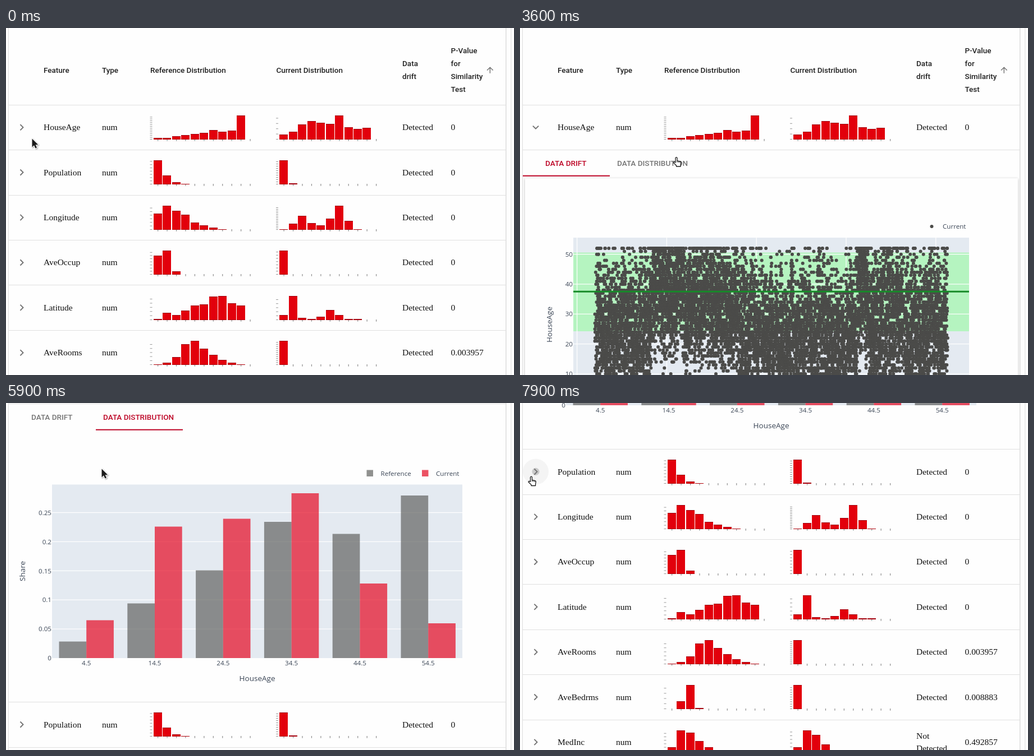
Animation, 905 px wide and 619 px high, one loop 8000 ms. Source, as an HTML page with a canvas:

```html
<!DOCTYPE html>
<html lang="en">
<head>
<meta charset="utf-8">
<title>Data drift table</title>
<style>
html, body { margin: 0; width: 100%; height: 100%; overflow: hidden; background: #fefefe; }
canvas { display: block; }
</style>
</head>
<body>
<canvas id="stage" width="905" height="619"></canvas>
<script>
const LOOP = 8000, STEP = 100, ROW = 80.4, PANEL = 532;
const HEAD = '500 13.5px Roboto, sans-serif';
const CELL = '15.5px "Liberation Serif", serif';
const AXIS = '11.6px "Open Sans", sans-serif';
const TITLE = '13.5px "Open Sans", sans-serif';
const INK = '#3b4656', GREY = '#757575', ACCENT = '#bd0526', PLOT = '#e4eaf1';

// Bar heights of the left and right histograms, and their y-axis tick spacing
const rows = [
  { name: 'HouseAge', p: '0', left: [3, 3, 6, 8, 10, 12, 17, 14, 16, 43], right: [9, 14, 27, 33, 30, 28, 43, 22, 19, 21], ticks: [3.3, 9.4] },
  { name: 'Population', p: '0', left: [43, 16, 4, 1], right: [43, 2], ticks: [5.8, 4] },
  { name: 'Longitude', p: '0', left: [29, 43, 34, 27, 13, 8, 4, 1], right: [1, 11, 25, 12, 8, 20, 43, 16, 1], ticks: [6.4, 3] },
  { name: 'AveOccup', p: '0', left: [34, 43, 6], right: [43], ticks: [5.6, 5.7] },
  { name: 'Latitude', p: '0', left: [2, 13, 9, 17, 26, 28, 42, 43, 30, 26], right: [9, 43, 4, 2, 6, 18, 9, 2, 2], ticks: [7.4, 7.2] },
  { name: 'AveRooms', p: '0.003957', left: [1, 4, 14, 37, 43, 29, 18, 9, 4, 1], right: [43], ticks: [7.2, 3.6] },
  { name: 'AveBedrms', p: '0.008883', left: [0, 14, 43, 2], right: [43], ticks: [9.2, 4.2] },
  { name: 'MedInc', p: '0.492857', left: [13, 43, 39, 24, 13, 6, 3, 1], right: [13, 43, 35, 18, 7, 3, 1], ticks: [6.2, 6.6] }
];

// Time, cursor shape, position
const cursorKeys = [
  [0, 'arrow', 46, 197], [300, 'arrow', 40, 191], [400, 'hand', 30, 184.5], [2200, 'hand', 32, 186.5],
  [2500, 'hand', 28.5, 180.5], [2700, 'hand', 34, 182], [2800, 'arrow', 43, 186], [2900, 'arrow', 49, 188],
  [3100, 'arrow', 118, 206], [3200, 'hand', 240, 246], [3300, 'hand', 312, 261], [3400, 'hand', 272.5, 230],
  [4200, 'arrow', 275, 231], [4700, 'cross', 274.5, 232.5], [5200, 'cross', 268, 222], [5300, 'arrow', 235, 180],
  [5400, 'arrow', 195, 140], [5500, 'arrow', 165, 104], [5600, 'arrow', 170, 117], [6500, 'arrow', 171, 124],
  [6900, 'arrow', 120, 127], [7000, 'arrow', 70, 126], [7100, 'hand', 24, 126], [7200, 'hand', 20, 129],
  [7600, 'hand', 12, 129], [7700, 'hand', 14, 130.5]
];
const scrollKeys = [[4000, 0], [4300, 51], [4600, 51], [4700, 154], [5800, 154], [6200, 402],
  [6500, 605], [6700, 666], [6800, 666], [6900, 667]];

const chevron = new Path2D('M-2-6L-3.4-4.6 1.2 0-3.4 4.6-2 6l6-6z');
const upArrow = new Path2D('M4 12l1.4 1.4L11 7.8V20h2V7.8l5.6 5.6L20 12l-8-8z');
const arrowShape = new Path2D('M.5.5V15.5L4 12.3 6.4 17.6 9 16.5 6.6 11.3H11.3z');
const handShape = new Path2D('M4.5 10V2.2a1.5 1.5 0 0 1 3 0V7l5.5 1.2q1.5.5 1.3 2l-.7 3.8V17H6v-1.8L1 10.5q0-2 1.8-1.3z');
const fingers = new Path2D('M7.5 7v3M10 7.6v2.6M12.3 8.1v2.4');
const crossShape = new Path2D('M-8.5 0H8.5M0-8.5V8.5');

const g = document.getElementById('stage').getContext('2d');

const clamp = v => Math.max(0, Math.min(1, v));

function sample(keys, t) {
  const i = keys.findIndex(k => k[0] > t);
  if (i === 0) return keys[0][1];
  if (i < 0) return keys[keys.length - 1][1];
  const [t0, a] = keys[i - 1], [t1, b] = keys[i];
  return a + (b - a) * (t - t0) / (t1 - t0);
}

function rect(x, y, w, h, color) {
  g.fillStyle = color;
  g.fillRect(x, y, w, h);
}

function disc(x, y, r, color) {
  g.fillStyle = color;
  g.beginPath();
  g.arc(x, y, r, 0, 7);
  g.fill();
}

function text(str, x, y, font, color, align = 'left') {
  g.font = font;
  g.fillStyle = color;
  g.textAlign = align;
  g.fillText(str, x, y);
}

function sideText(str, x, y) {
  g.save();
  g.translate(x, y);
  g.rotate(-Math.PI / 2);
  text(str, 0, 4.8, TITLE, INK, 'center');
  g.restore();
}

function shape(path, x, y, color, scale = 1, angle = 0) {
  g.save();
  g.translate(x, y);
  g.rotate(angle);
  g.scale(scale, scale);
  g.fillStyle = color;
  g.fill(path);
  g.restore();
}

function histogram(x, base, bars, gap) {
  for (let y = base - 1; y > base - 43; y -= gap) rect(x, y, 4, 1, '#999');
  for (let i = 0; i < 11; i++) rect(x + 13.5 + i * 16.45, base - 1, 1.2, 3.7, '#8c8c8c');
  bars.forEach((h, i) => {
    if (!h) return;
    const left = Math.round(x + 6.4 + i * 16.45);
    rect(left, base - h, 15, h, '#e2000c');
    rect(left, base - h, 15, 1, '#9c0010');
    rect(left, base - 1, 15, 1, '#b0000c');
  });
}

function header() {
  const label = (str, x, y) => text(str, x, y + 4.8, HEAD, '#212121');
  label('Feature', 67, 75);
  label('Type', 171, 75);
  label('Reference Distribution', 257, 75);
  label('Current Distribution', 481.5, 75);
  ['Data', 'drift'].forEach((s, i) => label(s, 706, 63.2 + i * 23.2));
  ['P-Value', 'for', 'Similarity', 'Test'].forEach((s, i) => label(s, 792.5, 40 + i * 23.2));
  shape(upArrow, 853.6, 66.3, GREY, 0.725);
  rect(5, 137, 885, 1, '#e0e0e0');
}

function row(r, cy, angle) {
  const cell = (str, x, dy = 0) => text(str, x, cy + 5 + dy, CELL, '#111');
  shape(chevron, 28, cy, GREY, 0.966, angle);
  cell(r.name, 67);
  cell('num', 171);
  const base = Math.round(cy + 21.7);
  histogram(256.5, base, r.left, r.ticks[0]);
  histogram(481, base, r.right, r.ticks[1]);
  if (r.name === 'MedInc') {
    cell('Not', 706, -10.7);
    cell('Detected', 706, 10.7);
  } else cell('Detected', 706);
  cell(r.p, 792.5);
  rect(5, Math.round(cy + 40), 885, 1, '#e0e0e0');
}

// Seeded scatter: each stretch of x has its own mean age and spread
const scatter = (() => {
  const layer = document.createElement('canvas');
  layer.width = 905;
  layer.height = 619;
  const c = layer.getContext('2d');
  let seed = 7;
  const rnd = () => (seed = seed * 16807 % 2147483647) / 2147483647;
  const bell = () => (rnd() + rnd() + rnd() + rnd() - 2) * 1.73;
  const zones = [[232, 24, 12], [296, 39, 10], [388, 33, 10], [432, 25, 12], [500, 21, 11],
    [560, 24, 12], [600, 21, 11], [622, 41, 11], [690, 27, 12], [763, 25, 12]];
  const total = 11500;
  let shift = 0;
  c.fillStyle = '#4b4b49';
  for (let i = 0; i < total; i++) {
    const x = 134 + 627 * i / total;
    if (i % 45 === 0) shift = bell() * 5;
    const [, mean, spread] = zones.find(z => x < z[0]);
    const age = Math.round(Math.max(2, Math.min(52, mean + shift + bell() * spread)));
    c.beginPath();
    c.arc(x + bell(), 670.4 - 5.333 * age, 3, 0, 7);
    c.fill();
  }
  return layer;
})();

function driftPlot() {
  g.save();
  g.shadowColor = 'rgba(0,0,0,.28)';
  g.shadowBlur = 4;
  g.shadowOffsetY = 1;
  rect(9, 268, 878, 470, '#fefefe');
  g.restore();
  disc(733.5, 354, 3, '#4b4b49');
  text('Current', 753, 358.2, AXIS, INK);
  rect(95, 374, 705, 300, PLOT);
  rect(95, 400.5, 705, 140.5, 'rgba(160,250,170,.68)');
  for (let i = 0; i < 5; i++) {
    rect(101 + i * 159.8, 374, 1.2, 300, '#fff');
    rect(95, 403 + i * 53.33, 705, 1.2, '#fff');
    text(String(50 - i * 10), 94, 407.8 + i * 53.33, AXIS, INK, 'right');
  }
  g.drawImage(scatter, 0, 0);
  rect(95, 468.7, 705, 3, '#168a28');
  sideText('HouseAge', 52, 529);
}

function sharePlot() {
  const greyBars = [29.5, 97.5, 156.5, 243, 221.5, 290], redBars = [67.5, 234.5, 248.5, 294, 133, 62];
  const grey = 'rgba(99,100,97,.7)', red = 'rgba(229,10,35,.7)';
  g.save();
  g.translate(0, 154);
  rect(642.5, 181.5, 11.5, 11.5, grey);
  text('Reference', 667.5, 191.5, AXIS, INK);
  rect(741, 181.5, 11.5, 11.5, red);
  text('Current', 766, 191.5, AXIS, INK);
  rect(82, 207.5, 731, 309.5, PLOT);
  for (let i = 0; i < 6; i++) {
    const y = 517 - i * 51.9, x = 143.2 + i * 121.8;
    if (i) rect(82, y - 0.6, 731, 1.2, '#fff');
    text(String(i * 5 / 100), 81, y + 4.2, AXIS, INK, 'right');
    text((i * 10 + 4.5).toFixed(1), x, 529.7, AXIS, INK, 'center');
  }
  for (let i = 0; i < 6; i++) {
    const x = 143.2 + i * 121.8;
    rect(x - 48.7, 517 - greyBars[i], 48.7, greyBars[i], grey);
    rect(x, 517 - redBars[i], 48.7, redBars[i], red);
  }
  text('HouseAge', 447.5, 557.8, TITLE, INK, 'center');
  sideText('Share', 29, 362);
  g.restore();
}

function panel(t) {
  const second = t >= 3900;
  text('DATA DRIFT', 45, 245.8, HEAD, second ? GREY : ACCENT);
  text('DATA DISTRIBUTION', 173, 245.8, HEAD, second ? ACCENT : GREY);
  rect(5 + 155 * clamp((t - 3800) / 300), 262.7, 155, 2, ACCENT);
  if (second) sharePlot();
  else driftPlot();
  rect(5, 749, 885, 1, '#e0e0e0');
}

function ripple(y, hover, grow, fade = 1) {
  disc(28, y, 23, `rgba(0,0,0,${0.04 * hover * fade})`);
  if (grow > 0) disc(28, y, 23 * (1 - (1 - grow) ** 2), `rgba(0,0,0,${0.165 * fade})`);
}

function cursor(t) {
  const [, kind, x, y] = cursorKeys.filter(k => k[0] <= t).pop();
  g.save();
  g.translate(x, y);
  g.lineJoin = 'round';
  const stroke = (path, width, color) => {
    g.lineWidth = width;
    g.strokeStyle = color;
    g.stroke(path);
  };
  if (kind === 'cross') {
    stroke(crossShape, 3.6, 'rgba(255,255,255,.8)');
    stroke(crossShape, 1.8, '#111');
  } else if (kind === 'arrow') {
    g.shadowColor = 'rgba(0,0,0,.35)';
    g.shadowBlur = 2;
    g.shadowOffsetX = g.shadowOffsetY = 1;
    stroke(arrowShape, 2, '#fff');
    g.shadowColor = 'transparent';
    g.fillStyle = '#1a1a1a';
    g.fill(arrowShape);
  } else {
    g.fillStyle = '#fff';
    g.fill(handShape);
    stroke(handShape, 1.3, '#1a1a1a');
    stroke(fingers, 0.9, '#1a1a1a');
  }
  g.restore();
}

function draw(t) {
  const open = t >= 2600;
  rect(0, 0, 905, 619, '#fefefe');
  g.save();
  g.translate(0, -Math.round(sample(scrollKeys, t)));
  header();
  if (t >= 1300 && t < 2900) ripple(177.2, 1, clamp((t - 1200) / 500), 1 - clamp((t - 2500) / 400));
  if (t >= 7100) ripple(789.4, clamp((t - 7000) / 200), t >= 7900 ? 0.155 : 0);
  rows.forEach((r, i) => {
    const angle = i ? 0 : clamp((t - 2500) / 300) * Math.PI / 2;
    row(r, 177.2 + ROW * i + (open && i ? PANEL : 0), angle);
  });
  if (open) panel(t);
  g.restore();
  rect(4, 0, 1, 619, '#dcdcdc');
  rect(890, 0, 1.5, 619, '#dcdcdc');
  rect(899, 0, 1.5, 619, '#e8e8e8');
  cursor(t);
}

// Motion advances in tenths of a second
function tick() {
  draw(Math.floor(performance.now() % LOOP / STEP) * STEP);
  requestAnimationFrame(tick);
}
tick();
</script>
</body>
</html>
```
